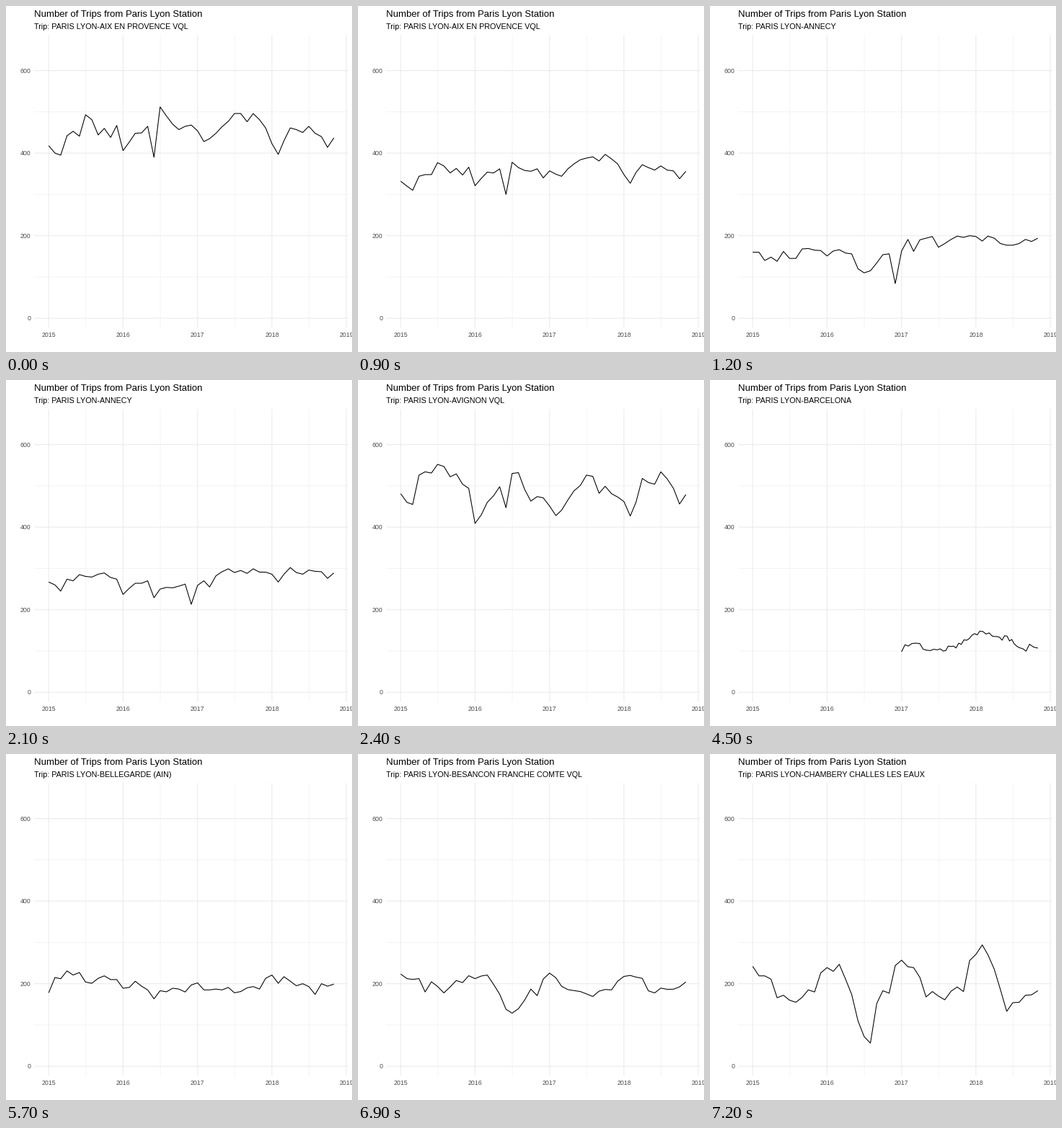
Recreate the animation shown at these times as a matplotlib script. Size 480x480 px, loop 8000 ms.

```python
import matplotlib.pyplot as plt
import numpy as np
from matplotlib.animation import FuncAnimation

SIZE, DPI = 480, 72
STEP, LOOP = 50, 8000
CYCLE, HOLD, TWEEN = 1200, 900, 150
LEFT, RIGHT, TOP, BOTTOM = 39.2, 474.5, 40.3, 446.5

plt.rcParams["font.family"] = "Liberation Sans"


def days(dates):
    dates = np.array(dates, dtype="datetime64[D]")
    return (dates - np.datetime64("2015-01-01")).astype(float)


def px(day):
    return 59.2 + 0.2826 * day


def py(trips):
    return 433.2 - 0.5727 * np.asarray(trips, dtype=float)


months = days(np.arange("2015-01", "2018-12", dtype="datetime64[M]"))

aix = [418, 400, 395, 442, 453, 441, 493, 481, 444, 460, 438, 467,
       406, 427, 448, 449, 465, 390, 512, 490, 470, 457, 465, 468,
       454, 428, 435, 448, 464, 477, 496, 496, 476, 496, 481, 461,
       423, 397, 430, 461, 457, 450, 465, 448, 440, 414, 437]
annecy = [160, 160, 140, 148, 138, 162, 145, 145, 168, 169, 165, 164,
          151, 163, 166, 158, 156, 120, 110, 115, 134, 154, 156, 84,
          163, 191, 162, 190, 194, 198, 172, 181, 191, 199, 196, 200,
          198, 187, 199, 194, 181, 177, 177, 181, 191, 186, 194]
avignon = [481, 460, 455, 526, 534, 531, 552, 547, 522, 529, 504, 494,
           409, 430, 460, 476, 498, 447, 530, 532, 491, 463, 474, 471,
           451, 428, 441, 466, 488, 501, 526, 523, 482, 499, 481, 473,
           462, 427, 460, 518, 508, 504, 534, 517, 494, 456, 479]
barcelona = [67, 57, 62, 43, 54, 84, 126, 115, 62, 73, 65]
bellegarde = [160, 218, 215, 240, 238, 230, 201, 207, 217, 219, 208, 207,
              184, 180, 205, 195, 190, 169, 196, 180, 201, 186, 186, 198,
              198, 177, 192, 195, 182, 196, 178, 185, 194, 198, 187, 229,
              236, 210, 231, 208, 202, 200, 186, 160, 203, 190, 191]
besancon = [214, 209, 206, 213, 187, 221, 210, 189, 205, 219, 214, 216,
            199, 213, 208, 192, 175, 152, 157, 181, 165, 189, 168, 195,
            210, 201, 171, 171, 191, 181, 178, 173, 182, 183, 187, 181,
            191, 183, 189, 202, 181, 200, 207, 202, 194, 202, 215]
chambery = [242, 219, 219, 211, 166, 172, 160, 155, 167, 185, 180, 226,
            239, 230, 247, 211, 174, 110, 72, 56, 152, 183, 177, 244,
            257, 241, 239, 215, 168, 181, 170, 161, 182, 192, 181, 256,
            271, 294, 270, 235, 186, 133, 154, 155, 172, 173, 183]


def path(trips):
    """Line in pixels; a short series is split up to one point per month."""
    day = months[-len(trips):]
    if len(trips) < len(months):
        knots = [0, 3, 5, 8, 11, 19, 26, 30, 41, 44, 46]
        idx = np.arange(len(months))
        day, trips = np.interp(idx, knots, day), np.interp(idx, knots, trips)
    return np.array([px(day), py(trips)])


routes = [
    ("AIX EN PROVENCE VQL", path(aix)),
    ("ANNECY", path(annecy)),
    ("AVIGNON VQL", path(avignon)),
    ("BARCELONA", path(barcelona)),
    ("BELLEGARDE (AIN)", path(bellegarde)),
    ("BESANCON FRANCHE COMTE VQL", path(besancon)),
    ("CHAMBERY CHALLES LES EAUX", path(chambery)),
]

fig = plt.figure(figsize=(SIZE / DPI, SIZE / DPI), dpi=DPI, facecolor="white")
ax = fig.add_axes([0, 0, 1, 1])
ax.set_xlim(0, SIZE)
ax.set_ylim(SIZE, 0)
ax.axis("off")


def grid(xs, ys, width):
    style = dict(color="#EBEBEB", lw=width, solid_capstyle="butt", snap=False)
    for x in xs:
        ax.plot([x, x], [TOP, BOTTOM], **style)
    for y in ys:
        ax.plot([LEFT, RIGHT], [y, y], **style)


years = np.arange(2015, 2020)
year_x = px(days([f"{y}-01-01" for y in years]))
ticks = np.arange(0, 601, 200)
grid((year_x[1:] + year_x[:-1]) / 2, py(ticks[:-1] + 100), 0.53)
grid(year_x, py(ticks), 1.07)

label = dict(size=8.8, color="#4D4D4D")
for x, year in zip(year_x, years):
    ax.text(x, 459.2, str(year), ha="center", va="baseline", **label)
for tick in ticks:
    ax.text(34.3, py(tick) + 3.2, str(tick), ha="right", va="baseline", **label)

ax.text(39.2, 15, "Number of Trips from Paris Lyon Station", size=13.1)
subtitle = ax.text(39.2, 32, "", size=10.7)
line, = ax.plot([], [], color="black", lw=1.07, snap=False,
                solid_capstyle="butt", solid_joinstyle="round")


def update(frame):
    cycle, t = divmod(frame * STEP, CYCLE)
    name, shape = routes[cycle]
    if t >= HOLD:
        mix = ((t - HOLD) // TWEEN + 1) / 3
        shape = shape + (routes[cycle + 1][1] - shape) * mix
    line.set_data(*shape)
    subtitle.set_text("Trip: PARIS LYON-" + name)
    return line, subtitle


anim = FuncAnimation(fig, update, frames=LOOP // STEP, interval=STEP,
                     repeat=True, repeat_delay=0)
plt.show()
```
